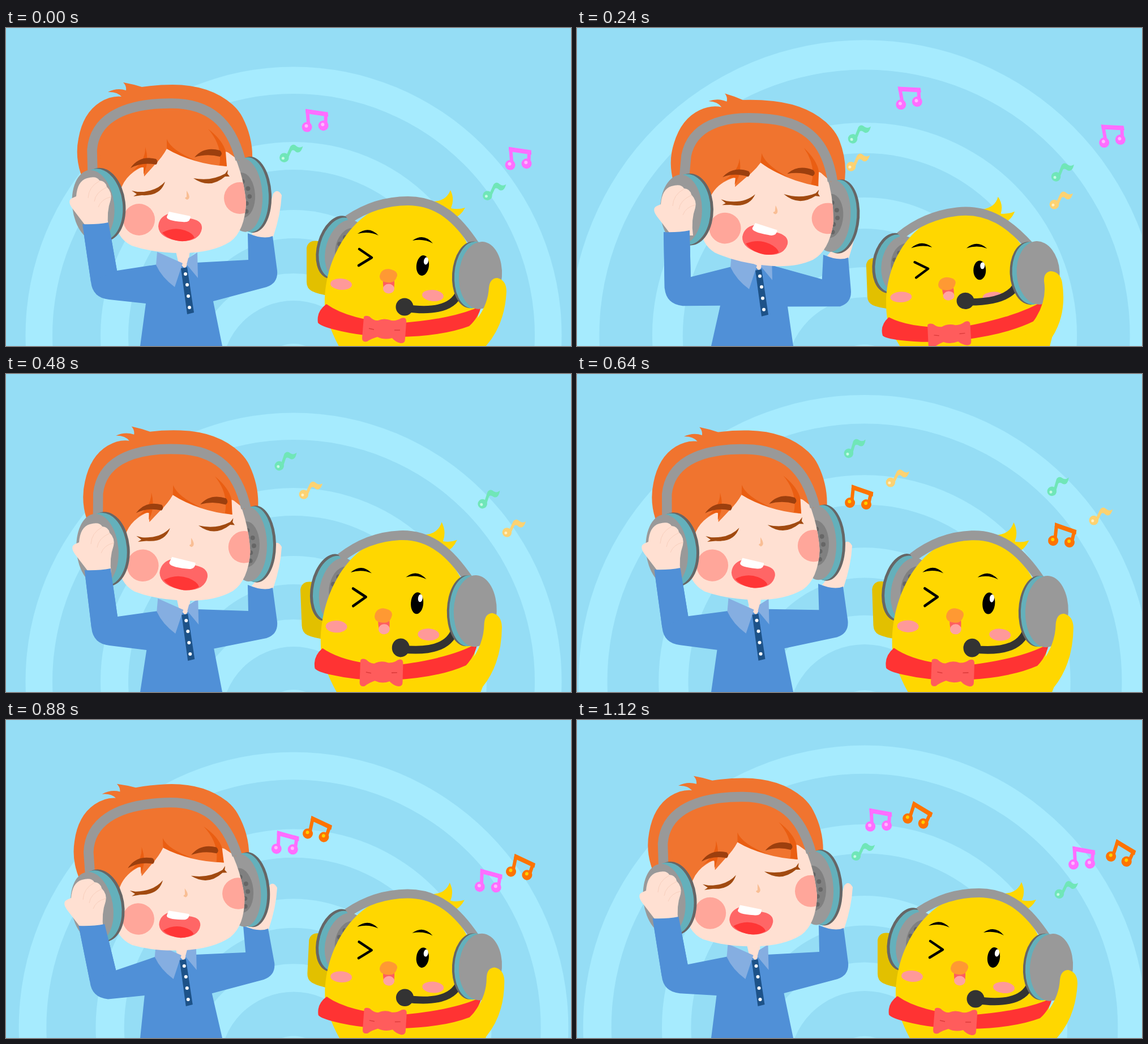
Animation of 998x561 px, one loop 1200 ms. Source, as an HTML page:

```html
<!DOCTYPE html>
<html lang="en">
<head>
<meta charset="utf-8">
<title>Singing along</title>
<style>
  html, body { margin: 0; height: 100%; overflow: hidden; background: #95ddf5; }
  svg { display: block; width: 100vw; height: 100vh; }
  .skin { fill: #ffe0d2; }
  .hair { fill: #f0742f; }
  .strand { fill: #ea5e12; }
  .brow { fill: #9c3f0e; }
  .lash { fill: #a14a10; }
  .shirt { fill: #5090d7; }
  .collar { fill: #85aee1; }
  .rim { fill: #666; }
  .pad { fill: #64b0bb; }
  .shell { fill: #999; }
  .mesh { fill: #808080; }
  .yellow { fill: #ffd700; }
  .band { fill: none; stroke: #999; }
</style>
</head>
<body>
<svg viewBox="0 0 998 561">
  <defs>
    <path id="faceShape" d="M190 270L192 335Q194 370 222 384Q260 397 310 397Q364 397 396 377Q422 358 424 308Q420 262 402 222L285 190L230 220Z"/>
    <clipPath id="faceClip"><use href="#faceShape"/></clipPath>
    <g id="pair">
      <path d="M-12 11V-16L20 -7L18 10" fill="none" stroke="currentColor" stroke-width="6"/>
      <path d="M-15 -20L24 -11V-3L-15 -12Z" fill="currentColor"/>
      <circle cx="-15" cy="12" r="9" fill="currentColor"/>
      <circle cx="14" cy="12" r="9" fill="currentColor"/>
      <circle cx="-16" cy="10" r="3"/>
      <circle cx="13" cy="10" r="3"/>
    </g>
    <g id="single">
      <path d="M-10 8L-1 -12Q4 -18 10 -12Q15 -8 21 -12Q17 2 9 -2Q4 -7 1 -4L-5 9Z" fill="currentColor"/>
      <circle cx="-12" cy="8" r="8.3" fill="currentColor"/>
      <circle cx="-14" cy="9" r="2.5"/>
    </g>
  </defs>

  <rect width="998" height="561" fill="#95ddf5"/>
  <g id="rings"></g>
  <g id="notes"></g>

  <g id="chick">
    <path id="leftWing" d="M531 388Q534 373 552 376L580 385L575 473Q552 470 540 464Q531 459 531 448Z" fill="#e2c000"/>
    <g transform="rotate(16 588 386)">
      <ellipse class="rim" cx="584" cy="388" rx="34" ry="57"/>
      <ellipse class="pad" cx="589" cy="388" rx="34" ry="55"/>
      <ellipse class="shell" cx="600" cy="388" rx="34" ry="54"/>
      <ellipse class="mesh" cx="606" cy="383" rx="24" ry="36"/>
      <g class="rim"><circle cx="588" cy="381" r="4"/><circle cx="590" cy="394" r="4"/><circle cx="594" cy="367" r="4"/></g>
    </g>
    <path class="yellow" d="M755 306Q778 305 785 286Q793 302 786 318Q798 321 811 317Q803 332 790 336Z"/>
    <path class="yellow" d="M563 490C561 400 620 306 710 306C785 306 838 395 838 470L836 500L820 560L810 640H640L594 572Q578 545 570 520Z"/>
    <path class="band" d="M604 338C638 315 674 305 710 305C766 305 800 340 829 384" stroke-width="16"/>
    <path d="M566 487Q548 500 551 520Q556 526 580 532Q630 545 690 545Q770 544 818 526Q834 512 840 490Q790 514 690 521Q605 515 566 487Z" fill="#f33"/>
    <path d="M632 510Q634 506 642 509Q650 517 657 516Q668 511 681 516Q690 517 698 512Q708 509 707 519L705 548Q705 557 697 556Q688 554 682 547Q668 551 656 545Q645 548 638 553Q629 555 629 547Z" fill="#ff5c5c"/>
    <path d="M641 530l9 2M686 533l10 0" stroke="#dc3b3b" stroke-width="1.5"/>
    <path d="M666 446H686Q687 468 676 468Q665 466 666 446Z" fill="#ff5e5e"/>
    <ellipse cx="676" cy="460" rx="10" ry="8.5" fill="#ffa3a3"/>
    <path d="M660 438Q662 425 676 425Q692 428 691 437Q687 451 675 449Q660 448 660 438Z" fill="#f93"/>
    <g fill="#f99">
      <ellipse cx="592" cy="452" rx="19" ry="10" transform="rotate(4 592 452)"/>
      <ellipse cx="754" cy="472" rx="19" ry="10" transform="rotate(5 754 472)"/>
    </g>
    <path d="M624 390L646 405L623 419" fill="none" stroke="#000" stroke-width="4.5" stroke-linecap="round" stroke-linejoin="round"/>
    <path d="M621 363Q641 348 658 366Q641 358 621 363ZM718 375Q738 361 754 380Q738 371 718 375Z"/>
    <ellipse cx="736" cy="419" rx="11" ry="18" transform="rotate(7 736 419)"/>
    <ellipse cx="742" cy="411" rx="4" ry="6.5" fill="#fff" transform="rotate(10 742 411)"/>
    <g id="mic">
      <path d="M704 494Q785 506 801 466" fill="none" stroke="#333" stroke-width="13"/>
      <circle cx="704" cy="492" r="15.5" fill="#333"/>
    </g>
    <g transform="rotate(4 832 436)">
      <ellipse class="rim" cx="822" cy="436" rx="34" ry="59"/>
      <ellipse class="pad" cx="826" cy="436" rx="34" ry="59"/>
      <ellipse class="shell" cx="838" cy="436" rx="38" ry="59.5"/>
    </g>
    <path id="rightWing" class="yellow" d="M853 458Q855 441 868 441Q884 445 884 465Q881 525 846 563L810 640H790L800 550L821 526Q851 495 853 458Z"/>
  </g>

  <path id="rightHand" class="skin" d="M434 364Q450 345 464 320L472 292Q480 282 487 295Q485 330 472 368Q455 378 434 364Z"/>
  <path id="shirt" class="shirt"/>
  <g id="neck">
    <path class="skin" d="M298 385H326L322 414L316 425L304 412Z"/>
    <path class="collar" d="M267 395L312 415L298 457Q275 440 265 418ZM338 396L339 441L319 417L322 406Z"/>
    <path d="M309 424L320 422L332 502L320 505Z" fill="#1d5288"/>
    <g fill="#fff"><circle cx="317" cy="434" r="3"/><circle cx="320" cy="453" r="3"/><circle cx="322" cy="473" r="3"/><circle cx="324" cy="493" r="3"/></g>
  </g>

  <g id="head">
    <path class="hair" d="M135 265Q121 230 128 195Q136 150 166 131Q185 119 204 121Q196 112 180 113Q196 105 212 110Q213 102 207 96Q224 99 240 104Q266 100 294 100Q360 100 400 135Q412 146 418 158Q437 195 435 235L400 260L200 280Z"/>
    <g transform="rotate(-3 434 294)">
      <ellipse class="rim" cx="434" cy="294" rx="35" ry="67"/>
      <ellipse class="pad" cx="430" cy="294" rx="34" ry="66"/>
      <ellipse class="shell" cx="420" cy="294" rx="33" ry="65"/>
      <ellipse class="mesh" cx="417" cy="294" rx="23" ry="40"/>
      <g class="rim"><circle cx="419" cy="270" r="4"/><circle cx="428" cy="283" r="4"/><circle cx="430" cy="297" r="4"/><circle cx="424" cy="309" r="4"/><circle cx="423" cy="323" r="4"/></g>
    </g>
    <use href="#faceShape" class="skin"/>
    <path class="hair" d="M175 290L160 180L285 125L400 170L412 234L386 215L390 244Q330 240 284 213Q276 228 262 242L244 262L243 244Q215 256 205 279L200 290Z"/>
    <path class="strand" d="M357 178Q383 198 388 218L390 244L377 242Q383 208 357 178ZM284 196Q292 216 336 234Q305 226 284 213ZM246 210Q247 235 222 253Q238 244 243 246L243 258Q254 236 246 210Z"/>
    <circle cx="235" cy="338" r="28" fill="#ffa69a"/>
    <circle cx="413" cy="300" r="28" fill="#ffa69a" clip-path="url(#faceClip)"/>
    <path class="brow" d="M220 247Q236 224 265 231Q270 236 265 241Q240 236 220 247ZM333 228Q350 208 378 216Q384 222 378 227Q355 221 333 228Z"/>
    <path class="lash" d="M222 287L232 289Q264 290 281 271Q273 297 240 295L225 297L231 293ZM331 265Q362 271 387 257L392 250L391 257L395 262L387 262Q360 285 331 265Z"/>
    <path d="M319 287Q328 300 320 303Q313 300 319 298Z" fill="#f9be94"/>
    <g id="mouth">
      <path d="M286 328Q310 333 330 337Q347 341 346 354Q342 377 308 376Q270 371 269 350Q270 334 286 328Z" fill="#f66"/>
      <path d="M276 361Q296 350 316 357Q330 362 333 370Q322 377 308 376Q287 374 276 361Z" fill="#ff3636"/>
      <path d="M288 324L326 332Q326 344 312 342Q283 340 284 333Z" fill="#fff"/>
    </g>
    <path class="band" d="M153 255L152 215C156 165 200 133 290 133C360 132 397 168 414 232" stroke-width="17.5"/>
    <g transform="rotate(-7 165 312)">
      <ellipse class="rim" cx="170" cy="312" rx="41" ry="65"/>
      <ellipse class="pad" cx="165" cy="312" rx="41" ry="64"/>
      <ellipse class="shell" cx="154" cy="312" rx="37" ry="63"/>
    </g>
  </g>

  <g id="leftHand">
    <path class="skin" d="M143 352L120 322Q106 305 117 300L124 297Q126 270 143 265Q160 260 165 269Q176 270 178 280Q188 290 185 303Q177 325 181 352Z"/>
    <path d="M165 270Q146 280 145 300M178 281Q158 290 156 306M185 298Q168 302 163 316" fill="none" stroke="#f8cfbd"/>
  </g>
  <path id="forearm" class="shirt"/>
</svg>

<script>
const STEP = 80, FRAMES = 15;
const el = id => document.getElementById(id);
const set = (node, name, value) => node.setAttribute(name, value);
const move = (id, value) => set(el(id), "transform", value);

// centre offset, radius: alternating light and dark discs
el("rings").innerHTML = [
  [0, 473.5], [0, 426], [0, 341], [0, 292], [20, 241], [20, 191], [66, 175], [66, 127], [75, 60]
].map(([y, r], i) => `<circle cy="${y}" r="${r}" fill="${i % 2 ? "#95ddf5" : "#a6ebfe"}"/>`).join("");

const notes = [
  { kind: "pair", color: "#ff6eff", shine: "#ffb8ff", start: 9, life: 10, x: 467, y: 243, vx: 13.1, vy: -13.6, turn: 5.7, spin: -1.75 },
  { kind: "single", color: "#70e6b8", shine: "#c4fbe4", start: 14, life: 10, x: 505, y: 232, vx: -1.6, vy: -11.3, turn: 1, spin: -1 },
  { kind: "single", color: "#fcd272", shine: "#fff0c0", start: 2, life: 7, x: 482, y: 247, vx: 14, vy: -10.6, turn: 0, spin: 0.2 },
  { kind: "pair", color: "#ff7300", shine: "#ffd000", start: 7, life: 8, x: 481, y: 225, vx: 17.3, vy: -8.3, turn: 4, spin: 2 }
];
el("notes").innerHTML = notes.map(n =>
  `<g color="${n.color}" fill="${n.shine}"><use href="#${n.kind}"/><use href="#${n.kind}"/></g>`).join("");

// step, ring, head x y turn stretch, mouth, left hand x y, right hand x y,
// chick x y turn stretch, wings, mic lift
const poses = [
  [0, 0, 0, 0, 0, 1, 1, 0, 0, 0, 0, 0, 0, 0, 1, 0, 0],
  [3, 1, 19, 22, 6.5, .975, 1.05, 24, 14, 8, 38, -22, 14, -7, .94, 1, 19],
  [6, 0, 4.5, 3, 1.9, 1.01, 1.1, 5, 0, 0, 10, -9, -11, -2.4, 1.06, 0, 0],
  [8, .667, 2.8, 1.5, 1.2, 1.005, 1, 2, -1, -1, 8, -8, -11, -2.1, 1.06, 0, 0],
  [10, 0, 2.4, 9, -2.4, .99, .93, -9, 17, -8, 2, -1, -2, -1, 1, 1, 3],
  [12, .5, .4, 9, -2.4, .99, .96, -9, 17, -8, 0, 1, 3, 0, .98, .3, 1],
  [14, .5, .5, 2.3, -.3, 1, 1, -2, 4, 0, 0, 0, 0, 0, 1, 0, 0]
];

function poseAt(step) {
  const next = poses.findIndex(p => p[0] > step);
  if (next < 0) return poses[poses.length - 1];
  const a = poses[next - 1], b = poses[next];
  const k = (step - a[0]) / (b[0] - a[0]);
  return a.map((v, i) => v + (b[i] - v) * k);
}

const shifted = (dx, dy) => (x, y) => `${x + dx} ${y + dy} `;

function drawShirt(lx, ly, rx, ry) {
  const wristL = shifted(lx * .75, ly), elbowL = shifted(lx * .2, ly * .8);
  const wristR = shifted(rx, ry), elbowR = shifted(rx * .6, ry * .9);
  const chest = shifted(lx * .25, ry * .1), side = shifted(lx * .25, ry * .25);
  const arm = `M${wristL(135, 346)}Q${wristL(160, 347)}${wristL(181, 343)}L${elbowL(196, 428)}`;
  set(el("forearm"), "d", `${arm}L${elbowL(150, 448)}Z`);
  set(el("shirt"), "d", `${arm}L${chest(268, 417)}L${chest(335, 414)}L${elbowR(428, 409)}
    L${wristR(427, 362)}Q${wristR(455, 374)}${wristR(471, 367)}L${elbowR(479, 428)}
    Q${elbowR(481, 450)}${elbowR(460, 457)}L${side(366, 482)}L382 561L237 561L${chest(247, 486)}
    L${elbowL(182, 479)}Q${elbowL(153, 476)}${elbowL(150, 448)}Z`);
  move("neck", `translate(${chest(0, 0)})`);
  move("leftHand", `translate(${lx} ${ly})`);
  move("rightHand", `translate(${rx} ${ry})`);
}

function drawNotes(step) {
  notes.forEach((n, i) => {
    const group = el("notes").children[i];
    const age = (step - n.start + FRAMES) % FRAMES;
    set(group, "visibility", age < n.life ? "visible" : "hidden");
    [...group.children].forEach((copy, j) => {
      const x = n.x + n.vx * age + 359 * j, y = n.y + n.vy * age + 67 * j;
      set(copy, "transform", `translate(${x} ${y}) rotate(${n.turn + n.spin * age})`);
    });
  });
}

// moves and stretches a part about its own anchor
const pose = (id, ax, ay, dx, dy, turn, stretch) =>
  move(id, `translate(${ax + dx} ${ay + dy}) scale(1 ${stretch}) rotate(${turn}) translate(${-ax} ${-ay})`);

function draw() {
  const step = Math.floor(performance.now() % (STEP * FRAMES) / STEP);
  const [, ring, hx, hy, tilt, tall, mouth, lx, ly, rx, ry, cx, cy, lean, stretch, wings, lift] = poseAt(step);
  move("rings", `translate(508 542) scale(${1 + ring * .1})`);
  pose("head", 315, 400, hx, hy, tilt, tall);
  move("mouth", `translate(307 350) scale(${mouth}) translate(-307 -350)`);
  pose("chick", 676, 438, cx, cy, lean, stretch);
  move("leftWing", `rotate(${wings * 5} 575 470)`);
  move("rightWing", `rotate(${wings * -4.5} 800 540)`);
  move("mic", `translate(0 ${-lift})`);
  drawShirt(lx, ly, rx, ry);
  drawNotes(step);
  requestAnimationFrame(draw);
}
draw();
</script>
</body>
</html>
```
